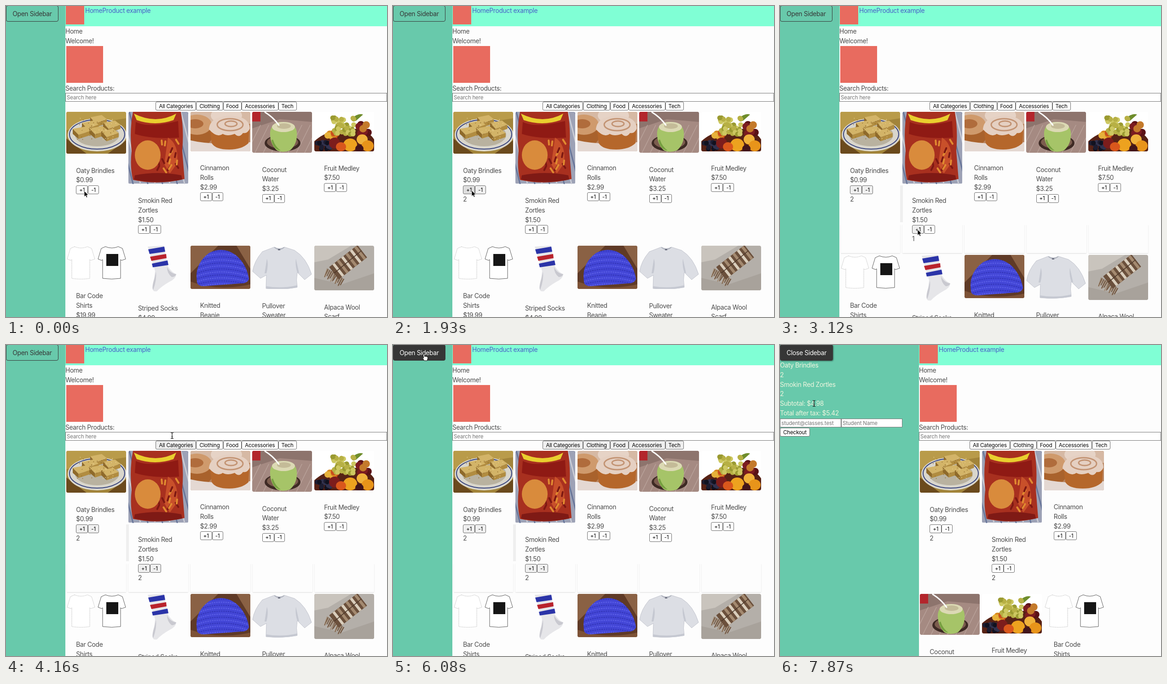
Animation of 828 by 676 pixels, one loop 8000 ms. Source, as an HTML page:

```html
<!DOCTYPE html>
<html lang="en">
<head>
<meta charset="utf-8">
<title>Shop</title>
<style>
* { box-sizing: border-box; }
html, body { margin: 0; width: 100%; height: 100%; overflow: hidden; }
body {
  position: relative; background: #fdfdfd; color: #4a4a4a;
  font: 13.8px/20.7px Inter, "Open Sans", sans-serif; letter-spacing: -.024em; white-space: nowrap;
}
aside, main, main > *, aside > * { position: absolute; }
aside { left: 0; top: 0; bottom: 0; width: 129px; background: #68c9ab; }
main { left: 129px; right: 0; top: 0; bottom: 0; }
.open aside { width: 302px; }
.open main { left: 302px; }

.toggle {
  left: 0; top: -1px; height: 34.5px; padding: 0 13.3px; line-height: 34px;
  border: 1px solid #363636; border-radius: 4px; color: #363636;
}
.dark .toggle { background: #363636; color: #fff; }
.open .toggle { box-shadow: 1px 1px 3px #0007; }
.cart { display: none; top: 34.2px; left: 0; color: #f0f6df; }
.open .cart { display: block; }
.cart button { position: absolute; left: 0; top: 146px; }
.field {
  height: 19px; padding: 0 2px; border: 1px solid #767676; background: #fff;
  color: #757575; font-size: 11.5px; line-height: 18px; letter-spacing: -.012em;
}
.cart .field { position: absolute; top: 125.5px; width: 132.5px; }

header { left: 0; right: 0; top: 0; height: 43.7px; background: #80ffd5; }
header span { position: absolute; left: 43px; top: 0; color: #485fc7; }
.logo { position: absolute; background: #e86b5f; }
.search { left: 0; right: 0; top: 189px; }
.cats { left: 0; right: 0; top: 208px; display: flex; justify-content: center; }
button {
  height: 19px; margin: 0; padding: 0 6px; border: 1px solid #6e6e6e; border-radius: 3px;
  background: #fff; color: #000; font: 11.5px/16px Inter, "Open Sans", sans-serif; letter-spacing: -.012em;
}
button.gray { background: #efefef; }
button.hot { background: #dedede; }

.grid { left: 0; top: 230px; display: grid; grid-template-columns: repeat(5, 134.75px); }
.open .grid { grid-template-columns: repeat(3, 134.75px); }
.card { position: relative; padding: 0 2px 24.7px; }
.card svg { display: block; width: 130px; border-radius: 4px; }
.info { padding: 26.6px 0 0 21.3px; }
.pair { display: flex; height: 20.7px; padding-top: 1px; }
.edges .card::after {
  content: ""; position: absolute; left: 2.5px; right: 2.5px; top: 245px; bottom: 4px;
  box-shadow: 0 1px 2px #0002; clip-path: inset(0 -4px -4px);
}
.bar { left: 132px; top: 390px; width: 6px; background: #efefef; }
#cursor { position: absolute; left: 0; top: 0; width: 1px; height: 1px; overflow: visible; }
#cursor path { display: none; }
#cursor path.on { display: inline; }
</style>
</head>
<body>
<aside>
  <div class="toggle">Open Sidebar</div>
  <div class="cart">
    Oaty Brindles<br>2<br>Smokin Red Zortles<br>2<br>Subtotal: $4.98<br>Total after tax: $5.42
    <div class="field" style="left:0">student@classes.test</div>
    <div class="field" style="left:133px">Student Name</div>
    <button>Checkout</button>
  </div>
</aside>
<main>
  <header><i class="logo" style="left:1px;top:0;width:40px;height:40px"></i><span>HomeProduct example</span></header>
  <div style="top:44.8px">Home<br>Welcome!</div>
  <i class="logo" style="left:2px;top:87px;width:80px;height:80px"></i>
  <div style="top:169px">Search Products:</div>
  <div class="field search">Search here</div>
  <div class="cats"></div>
  <div class="bar"></div>
  <div class="grid"></div>
</main>
<svg id="cursor">
  <path data-kind="arrow" d="M0 0V12.6L2.9 9.9 4.9 14.4 7 13.4 5.1 9.1H9Z" stroke="#fff" stroke-width=".8"/>
  <path data-kind="beam" d="M-3-6.5Q0-6.5 0-4.5 0-6.5 3-6.5M0-5V5M-3 6.5Q0 6.5 0 4.5 0 6.5 3 6.5M-1.5 2H1.5" fill="none" stroke="#111" stroke-width="1.2"/>
  <path data-kind="hand" d="M-4.5-5.5c0-1.6 2.3-1.8 2.6-.2l.8 4 1.6-.6 2 .3 1.8.6c1.4.5 1.6 2 1.2 3.6L4.3 7H-2L-5 2.6c-1-1.6.2-2.4 1.6-1.2z" fill="#fff" stroke="#111"/>
</svg>
<script>
const LOOP = 8000, OPEN = 6230;
const $ = s => document.querySelector(s);

// SVG helpers for the product pictures
const fill = (w, h, c) => `<rect width="${w}" height="${h}" fill="${c}"/>`;
const box = (x, y, w, h, c) => `<rect x="${x}" y="${y}" width="${w}" height="${h}" fill="${c}"/>`;
const oval = (x, y, rx, ry, c, more = '') => `<ellipse cx="${x}" cy="${y}" rx="${rx}" ry="${ry}" fill="${c}" ${more}/>`;
const path = (d, c, more = '') => `<path d="${d}" fill="${c}" ${more}/>`;
const line = (d, c, w) => path(d, 'none', `stroke="${c}" stroke-width="${w}" stroke-linecap="round"`);
const range = (n, f) => Array.from({ length: n }, (_, i) => f(i)).join('');
let seed = 7;
const rnd = () => (seed = seed * 16807 % 2147483647) / 2147483647;
const pile = (n, x, y, w, h, r, colors) => range(n, i =>
  oval(x + rnd() * w, y + rnd() * h, r, r, colors[i % colors.length]));

const oat = (x, y, s) => path(`M${x} ${y}l${20 * s}-5 ${9 * s} 9-${20 * s} 9z`, '#d3b468') +
  path(`M${x} ${y}l${9 * s} 13v9l-${9 * s}-11z`, '#8f6a2a') +
  path(`M${x + 9 * s} ${y + 13}l${20 * s}-9v9l-${20 * s} 9z`, '#b18c40');
const bars = () => fill(130, 91, '#a2843a') + path('M0 0H130V14L70 24 0 40Z', '#b99b4a') +
  path('M0 58L44 91H0ZM130 62V91H90Z', '#6b4a1d') +
  oval(67, 50, 64, 36, '#d9d6cc') + oval(67, 49, 60, 32, 'none', 'stroke="#39457f" stroke-width="2"') +
  oval(67, 50, 48, 25, '#b9b2a0') +
  oat(52, 12, 1.25) + oat(80, 24, 1.3) + oat(34, 24, 1.25) + oat(14, 37, 1.4) + oat(50, 36, 1.4) + oat(76, 42, 1.3) +
  pile(60, 24, 14, 84, 50, .9, ['#e6cd8c', '#8f6a2a']);

const bag = () => fill(130, 156, '#9da2b6') +
  range(12, i => line(`M${i * 16 - 30} 0l40 156`, i % 2 ? '#c9cbd4' : '#68769a', 3)) +
  path('M10 0H114Q121 40 117 84L122 146Q66 160 10 148Q3 120 7 86Q2 40 10 0Z', '#a8301f') +
  path('M16 22Q44 36 108 20L110 56Q50 60 14 48Z', '#8f1a14') +
  path('M86 56Q110 70 106 112L90 134 78 114Z', '#c8502a') +
  range(16, i => line(`M${62 + rnd() * 46} ${46 + rnd() * 78}l${rnd() * 12 - 6} 9`, i % 2 ? '#e08a30' : '#7d1812', 4)) +
  path('M12 4Q60 28 104 4L98 18Q58 32 18 18Z', '#e9cf2e') +
  oval(42, 94, 28, 32, '#d98b3c') + path('M14 138Q64 128 115 138L117 147Q64 158 12 147Z', '#7f1a15');

const rolls = () => fill(130, 86, '#b98560') + path('M0 0H130V26L40 34 0 20Z', '#d6b9a4') +
  oval(14, 44, 36, 34, '#a9622c') + oval(14, 28, 32, 22, '#cf9a6c') + oval(10, 26, 18, 10, '#b06c3c') +
  oval(78, 8, 34, 18, '#e6d3c6') + path('M0 62Q50 74 130 66V86H0Z', '#e4d8d2') +
  path('M42 34Q84 20 128 34L126 68Q112 82 84 82 54 82 46 68Z', '#b5672b') +
  path('M40 38Q42 10 86 8 128 10 129 36 124 48 114 46 106 58 96 48 80 54 70 48 58 58 40 38Z', '#e5d0c2') +
  oval(86, 28, 28, 13, 'none', 'stroke="#c39474" stroke-width="3"') +
  oval(88, 26, 13, 6, 'none', 'stroke="#c39474" stroke-width="3"');

const coconut = () => fill(130, 89, '#a58a82') + path('M0 0H130V22L60 16 0 36Z', '#8d746d') +
  range(9, i => line(`M${i * 18 - 12} 89l30-60`, '#b9a29a', 1.5)) + box(0, 0, 18, 21, '#b3262c') +
  oval(66, 68, 39, 18, '#3e2a24') + oval(66, 66, 34, 14, '#7c5d4e') +
  path('M39 44Q42 22 66 22 94 22 97 44 99 70 82 84 66 90 54 84 38 70 39 44Z', '#a6c468') +
  path('M45 60Q50 76 62 84 46 82 42 62Z', '#76a040') +
  oval(68, 33, 25, 11, '#dcd9b4') + oval(69, 31, 15, 6, '#c4bb98') + line('M28 1Q46 12 58 29', '#fff', 3);

const fruit = () => fill(130, 86, '#fff') + path('M82 14Q96 2 106 6L90 20Z', '#6e8d2c') +
  path('M0 86V64Q20 46 40 44L95 36Q120 44 130 60V86Z', '#572215') +
  pile(12, 20, 46, 30, 10, 7, ['#d98a20', '#c94e1d', '#e7b13a']) +
  pile(44, 40, 13, 46, 36, 5.5, ['#b7b045', '#cdc861', '#9a9a31']) +
  pile(9, 92, 26, 26, 24, 8, ['#5a1216', '#7b1c20', '#c47a2b']) +
  pile(20, 6, 66, 30, 16, 5, ['#1d1d31', '#32324e', '#111220']) +
  oval(44, 68, 12, 12, '#7d1d1c') + oval(78, 72, 15, 14, '#eda21f') + oval(58, 76, 11, 10, '#d9571c') +
  oval(104, 60, 12, 11, '#f0b23b') + oval(116, 74, 13, 12, '#e8941a') + oval(98, 80, 9, 8, '#42151a');

const tee = (x, c, dash) => path('M17 2Q31 8 45 2L54 6 61 29 52 32 50 30V71Q31 74 11 71V30L9 32 1 29 8 6Z', '#fff',
  `transform="translate(${x} 0)" stroke="${c}" stroke-width=".8" stroke-dasharray="${dash}"`);
const shirts = () => tee(1, '#a9a9a9', '1.5 1') + tee(68, '#333', 'none') + box(87, 18, 26, 26, '#161616');

const socks = () => path('M42 2L77 0 86 45Q94 58 104 62 103 72 90 78 72 88 62 99 53 101 52 92 56 75 58 55Z', '#e6e6e9') +
  path('M60 56Q62 74 54 96 50 90 57 70ZM84 46Q90 60 104 62 102 68 94 68 84 60 84 46Z', '#c9c9d0') +
  path('M43 8L78 2 80 13 46 18ZM51 39L85 32 87 42 53 47Z', '#2b34a8') + path('M47 24L82 18 83 27 50 33Z', '#b9232c');

const dome = 'M14 78Q8 40 40 16 70 0 98 20 122 40 127 72 124 82 110 82L30 88Q14 88 14 78Z';
const beanie = () => fill(130, 94, '#5f3a26') + path('M0 0H60L20 40 0 60ZM100 0H130V50Z', '#8a6144') +
  path('M0 78Q60 100 130 84V94H0Z', '#7d5236') + path(dome, '#4346d6') +
  `<clipPath id="dome"><path d="${dome}"/></clipPath><g clip-path="url(#dome)">` +
  range(16, i => path(`M8 ${20 + i * 6}Q66 ${-10 + i * 7} 130 ${20 + i * 6}`, 'none',
    `stroke="${i % 2 ? '#2d2fae' : '#6468ee'}" stroke-width="1.6" stroke-dasharray="3 2"`)) + '</g>';

const sweater = () => path('M48 3Q59 9 70 3L92 10Q118 26 129 62L114 74 98 58Q95 75 98 90 65 97 30 93L31 64 18 71 1 56Q4 34 22 13Z', '#dcdee4', 'stroke="#b9bcc6" stroke-width=".8"') +
  path('M31 60Q36 40 32 28L27 60ZM98 58Q93 42 95 28L102 60ZM30 88Q64 94 98 86V91Q65 97 30 93Z', '#c5c8d1') +
  line('M49 4Q59 12 69 4', '#aeb2bd', 2) + box(56, 7, 5, 3, '#6d7180');

const scarf = () => fill(130, 98, '#b4afa9') + path('M0 70L60 84 130 60V98H0Z', '#a8a29b') +
  path('M0 0H80L30 30 0 36Z', '#c9c4bd') +
  range(20, i => line(`M${28 + i * 1.9} ${50 + i * 1.2}l${-6 - i % 3} ${18 - i % 4 * 2}`, i % 2 ? '#6b503c' : '#a08a72', 1.8)) +
  '<g transform="translate(94 20) rotate(142)">' + box(-13, -17, 78, 34, '#6b503c') +
  range(6, i => box(-10 + i * 12, -17, 6, 34, i % 2 ? '#d9cdbb' : '#a48a70')) +
  line('M-12 2L64 0', '#4c3729', 1.5) + '</g>';

const products = [
  ['Oaty Brindles', '0.99', 91, bars], ['Smokin Red<br>Zortles', '1.50', 156.5, bag],
  ['Cinnamon<br>Rolls', '2.99', 85.5, rolls], ['Coconut<br>Water', '3.25', 89, coconut],
  ['Fruit Medley', '7.50', 86, fruit], ['Bar Code<br>Shirts', '19.99', 73, shirts],
  ['Striped Socks', '4.99', 100, socks], ['Knitted<br>Beanie', '9.99', 94, beanie],
  ['Pullover<br>Sweater', '24.99', 94.5, sweater], ['Alpaca Wool<br>Scarf', '29.99', 97.5, scarf],
];
$('.grid').innerHTML = products.map(([name, price, h, draw]) =>
  `<div class="card"><svg viewBox="0 0 130 ${h}" height="${h}">${draw()}</svg><div class="info">${name}<br>$${price}
  <div class="pair"><button>+1</button><button>-1</button></div><div class="count"></div></div></div>`).join('');
$('.cats').innerHTML = ['All Categories', 'Clothing', 'Food', 'Accessories', 'Tech']
  .map(c => `<button>${c}</button>`).join('');

// time, x, y, kind
const moves = [
  [0, 170, 402, 'arrow'], [150, 168, 402, 'arrow'], [600, 169.5, 402, 'arrow'], [1190, 171, 401, 'arrow'],
  [2070, 206, 403, 'arrow'], [2220, 258, 415, 'arrow'], [2370, 289, 455, 'arrow'], [2520, 299, 480, 'arrow'],
  [2670, 299, 486, 'arrow'], [3870, 310, 440, 'arrow'], [4010, 350, 222, 'arrow'], [4160, 361, 197, 'beam'],
  [4310, 372, 190, 'beam'], [4450, 384, 187, 'beam'], [4750, 390, 194, 'beam'], [4900, 440, 216, 'arrow'],
  [5040, 520, 218, 'arrow'], [5190, 600, 216, 'arrow'], [5340, 545, 150, 'arrow'], [5490, 400, 96, 'arrow'],
  [5640, 240, 60, 'arrow'], [5780, 120, 38, 'arrow'], [5930, 70, 27, 'hand'], [6820, 77, 34, 'hand'],
  [7270, 78, 34, 'hand'], [7720, 76, 84, 'beam'], [7870, 74, 127, 'beam'],
];
const cards = [...document.querySelectorAll('.card')];
const clicks = [[890, 1340], [3120, 3720]];
const [plusA, minusA] = cards[0].querySelectorAll('button');
const [plusB, minusB] = cards[1].querySelectorAll('button');
const grays = [[plusA, 150], [minusA, 1190], [plusB, 2520], [minusB, 3720]];
[...$('.cats').children].forEach((b, i) => grays.push([b, [4010, 4900, 5040, 5040, 5190][i]]));
const cursors = [...document.querySelectorAll('#cursor path')];
const within = (t, a, b) => t >= a && t < b;

function draw() {
  const t = performance.now() % LOOP, open = t >= OPEN;
  const cls = document.body.classList;
  cls.toggle('dark', t >= 5930);
  cls.toggle('open', open);
  cls.toggle('edges', within(t, 3120, OPEN));
  $('.toggle').textContent = open ? 'Close Sidebar' : 'Open Sidebar';
  $('.bar').style.height = (within(t, 2220, OPEN) ? t < 2370 ? 41 : 80 : 0) + 'px';
  clicks.forEach((times, i) => {
    const n = times.filter(c => t >= c).length;
    cards[i].querySelector('.count').textContent = n || '';
  });
  grays.forEach(([b, from]) => b.classList.toggle('gray', within(t, from, OPEN)));
  plusA.classList.toggle('hot', within(t, 150, 300) || within(t, 1190, 2070));
  const [, x, y, kind] = moves.filter(m => t >= m[0]).pop();
  cursors.forEach(c => c.classList.toggle('on', c.dataset.kind === kind));
  $('#cursor').style.transform = `translate(${x}px, ${y}px)`;
  requestAnimationFrame(draw);
}
draw();
</script>
</body>
</html>
```
